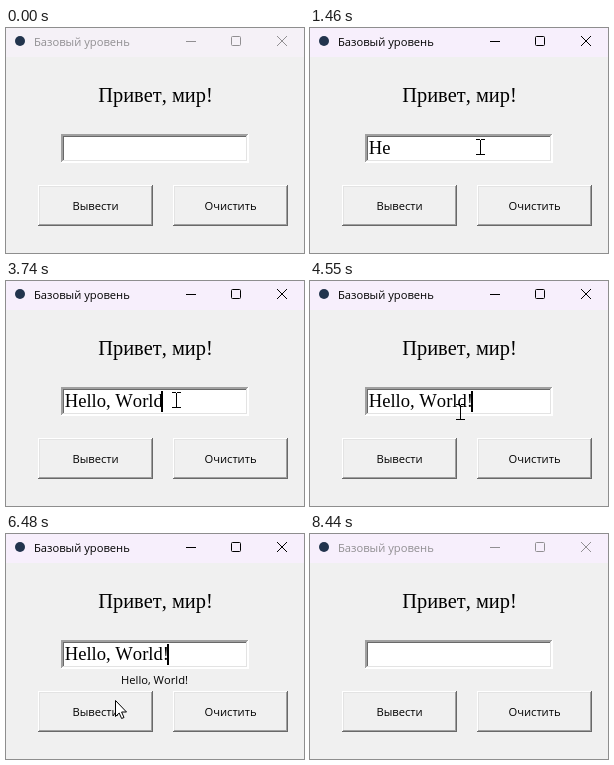
Recreate the animation shown at these times as an HTML page with a canvas. Size 298 by 225 pixels, loop 8.6 s.

```html
<!DOCTYPE html>
<html lang="ru">
<head>
<meta charset="utf-8">
<title>Базовый уровень</title>
<style>
  html, body { margin: 0; width: 100%; height: 100%; overflow: hidden; background: #f0f0f0; }
  canvas { display: block; width: 298px; height: 225px; }
</style>
</head>
<body>
<canvas id="stage" width="298" height="225"></canvas>
<script>
const ctx = document.getElementById('stage').getContext('2d');
const LOOP = 8600;
const FACE = '#f0f0f0';
const UI_FONT = '500 11.2px "Open Sans", "Noto Sans", sans-serif';
const serif = size => `${size}px "Liberation Serif", "Noto Serif", serif`;

const MESSAGE = 'Hello, World!';
const KEY_TIMES = [1220, 1430, 1790, 2050, 2300, 2460, 2790, 3040, 3290, 3500, 3580, 3660, 4420];
const CARET_TOGGLES = [860, 1460, 1790, 2300, 2660, 3290, 3500, 4200, 4420, 5030,
                       5320, 5950, 6230, 6820, 7150, 7740, 8040, 8440];
const FOCUS = { start: 860, end: 8440 };
const CLICK = { entry: [860, 960], print: [4980, 5110], clear: [7170, 7510] };
// Pointer path: time, x, y
const PATH = [
  [450, 225, 145], [530, 208, 108], [710, 208, 108], [860, 170, 119],
  [4450, 170, 119], [4850, 91, 165], [6380, 91, 165], [6480, 108, 166],
  [6640, 265, 177], [7730, 265, 177], [7990, 272, 228]
];

const within = (t, [from, to]) => t >= from && t < to;
const passed = (times, t) => times.filter(time => time <= t).length;
const clamp01 = v => Math.min(1, Math.max(0, v));
const mix = (a, b, k) => `rgb(${a.map((v, i) => Math.round(v + (b[i] - v) * k))})`;

function fill(color, x, y, w, h) {
  ctx.fillStyle = color;
  ctx.fillRect(x, y, w, h);
}

function disc(color, x, y, r) {
  ctx.fillStyle = color;
  ctx.beginPath();
  ctx.arc(x, y, r, 0, 2 * Math.PI);
  ctx.fill();
}

function text(str, x, y, font, color = '#000', align = 'left') {
  ctx.font = font;
  ctx.fillStyle = color;
  ctx.textAlign = align;
  ctx.fillText(str, x, y);
}

// Nested bevel rings, from the outside in: [top-left color, bottom-right color]
function bevel(x, y, w, h, rings) {
  for (const [light, dark] of rings) {
    fill(dark, x, y, w, h);
    fill(light, x, y, w - 1, h - 1);
    x++; y++; w -= 2; h -= 2;
    fill(FACE, x, y, w, h);
  }
}

function drawTitleBar(t) {
  const active = t >= FOCUS.start && t < FOCUS.end;
  const tint = t < FOCUS.start ? 0.5 * clamp01(1 - t / 120) : clamp01((t - FOCUS.start) / 140);
  fill(mix([243, 243, 243], [247, 239, 252], tint), 0, 0, 298, 29);
  disc('#22344d', 14, 13, 5);

  const ink = active ? mix([145, 143, 146], [0, 0, 0], tint) : '#918f92';
  text('Базовый уровень', 28, 18, UI_FONT, ink);
  ctx.strokeStyle = ink;
  ctx.lineWidth = 1;
  ctx.beginPath();
  ctx.moveTo(180, 13.5);
  ctx.lineTo(190, 13.5);
  ctx.roundRect(225.5, 8.5, 9, 9, 1);
  ctx.moveTo(271, 8);
  ctx.lineTo(281, 18);
  ctx.moveTo(281, 8);
  ctx.lineTo(271, 18);
  ctx.stroke();
}

function drawEntry(t) {
  bevel(55, 106, 188, 29, [['#a0a0a0', '#fff'], ['#a0a0a0', '#fff'], ['#696969', '#e3e3e3']]);
  fill('#fff', 58, 109, 182, 23);
  const typed = t < CLICK.clear[1] ? MESSAGE.slice(0, passed(KEY_TIMES, t)) : '';
  const left = 58.7;
  text(typed, left, 126, serif(18.6));
  if (passed(CARET_TOGGLES, t) % 2) {
    const end = left + ctx.measureText(typed).width;
    fill('#000', Math.max(58, Math.round(end) - 2), 110, 2, 21);
  }
}

function drawButton(label, x, pressed) {
  bevel(x, 157, 115, 41, pressed
    ? [['#a0a0a0', '#fff'], ['#696969', '#e3e3e3']]
    : [['#fff', '#696969'], ['#e3e3e3', '#a0a0a0']]);
  const shift = pressed ? 1 : 0;
  text(label, x + 57.5 + shift, 182 + shift, UI_FONT, '#000', 'center');
}

function pointerAt(t) {
  const next = PATH.findIndex(([time]) => time > t);
  if (next < 1) return null;
  const [t0, x0, y0] = PATH[next - 1];
  const [t1, x1, y1] = PATH[next];
  const k = (t - t0) / (t1 - t0);
  return [x0 + (x1 - x0) * k, y0 + (y1 - y0) * k];
}

function drawPointer(t) {
  const pos = pointerAt(t);
  if (!pos) return;
  const [x, y] = pos.map(Math.round);
  if (Object.values(CLICK).some(span => within(t, span))) disc('rgba(255,255,0,.5)', x, y, 12);

  if (x > 55 && x < 242 && y > 106 && y < 134) {
    fill('#000', x, y - 7, 1, 15);
    for (const edge of [y - 8, y + 7]) {
      fill('#000', x - 4, edge, 4, 1);
      fill('#000', x + 1, edge, 4, 1);
    }
    return;
  }
  const arrow = new Path2D('M.5 .5V16.5L4.2 13L6.6 18.5L9 17.5L6.6 12H11.5Z');
  ctx.save();
  ctx.translate(x, y);
  ctx.fillStyle = '#fff';
  ctx.strokeStyle = '#000';
  ctx.lineWidth = 1;
  ctx.fill(arrow);
  ctx.stroke(arrow);
  ctx.restore();
}

function draw(t) {
  fill(FACE, 0, 0, 298, 225);
  drawTitleBar(t);
  text('Привет, мир!', 149.5, 74, serif(20.4), '#000', 'center');
  drawEntry(t);
  if (t >= CLICK.print[1] && t < CLICK.clear[1]) {
    text(MESSAGE, 148.5, 150, UI_FONT, '#000', 'center');
  }
  drawButton('Вывести', 32, within(t, CLICK.print));
  drawButton('Очистить', 167, within(t, CLICK.clear));
  drawPointer(t);
}

ctx.fontKerning = 'none';
const start = performance.now();
function tick() {
  draw((performance.now() - start) % LOOP);
  requestAnimationFrame(tick);
}
tick();
</script>
</body>
</html>
```
